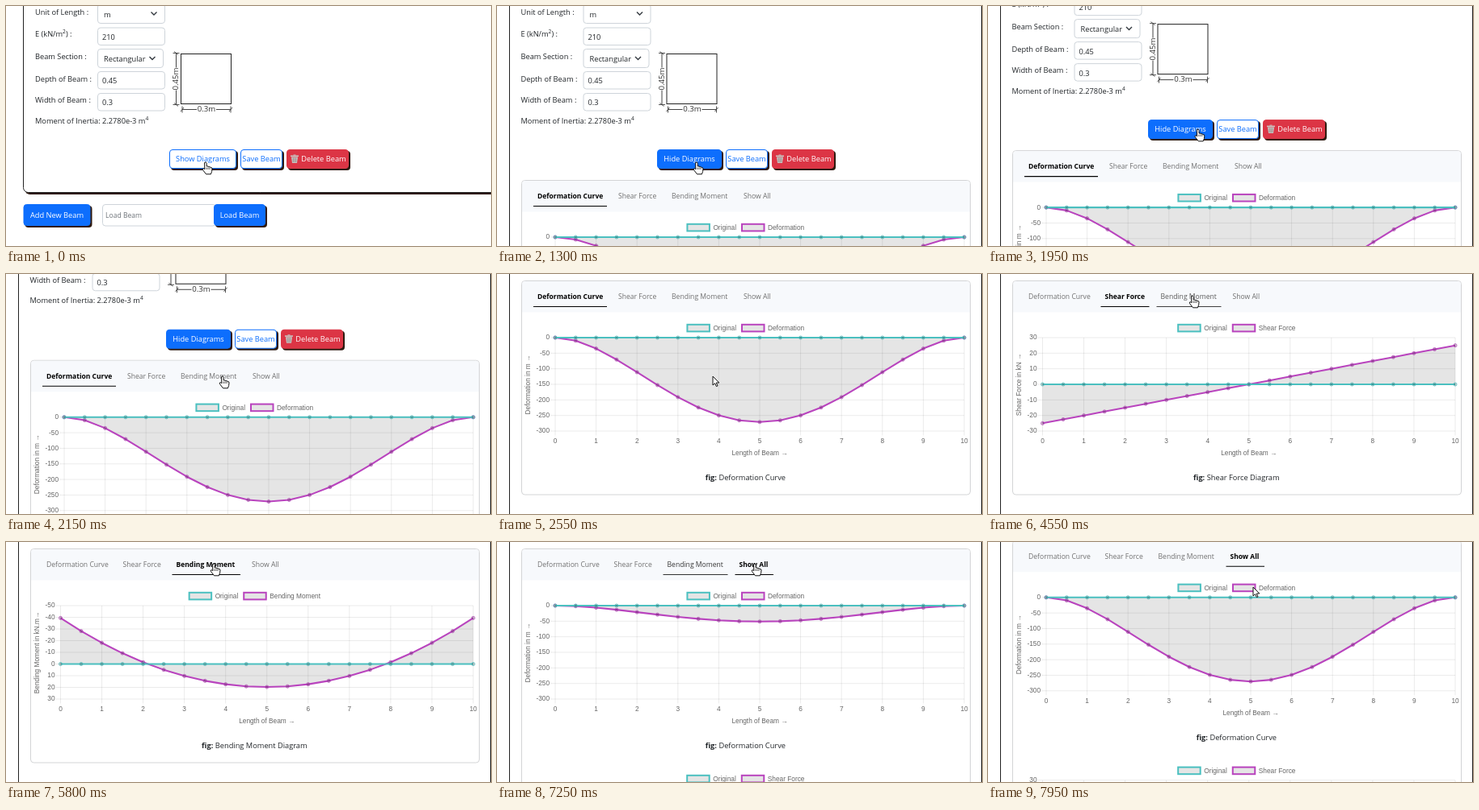
Write an HTML page with a canvas that moves like this. It is 600 px wide and 298 px high and loops after 8 s.

```html
<!DOCTYPE html>
<html lang="en">
<head>
<meta charset="utf-8">
<title>Beam diagrams</title>
<style>
  html, body { margin: 0; width: 100%; height: 100%; overflow: hidden; background: #fff; }
  canvas { display: block; width: 600px; height: 298px; }
</style>
</head>
<body>
<canvas id="stage" width="600" height="298"></canvas>
<script>
const ctx = document.getElementById('stage').getContext('2d');
const LOOP = 8000;
const UI = '"Open Sans", "Noto Sans", sans-serif';
const ARIAL = '"Liberation Sans", Arial, sans-serif';
const BLUE = '#0d6efd', RED = '#dc3545', INK = '#212529', SHADE = '#2e1a10';
const TEAL = '#4bc0c0', PURPLE = '#b944be';

// Moments at which each view opens
const OPEN = 980;
const VIEWS = [OPEN, 3640, 5150, 7200];

const clamp = v => Math.max(0, Math.min(1, v));
const span = (t, a, b) => clamp((t - a) / (b - a));
const smooth = u => u * u * (3 - 2 * u);
const outQuart = u => 1 - (1 - u) ** 4;
const mix = (a, b, u) => a + (b - a) * u;
const grey = v => `rgb(${v},${v},${v})`;

function text(str, x, y, { size = 9.25, color = INK, align = 'left', weight = 400, font = UI } = {}) {
  ctx.font = `${weight} ${size}px ${font}`;
  ctx.fillStyle = color;
  ctx.textAlign = align;
  ctx.textBaseline = 'alphabetic';
  ctx.fillText(str, x, y + size * 0.35);
  return ctx.measureText(str).width;
}

function turned(str, x, y, style) {
  ctx.save();
  ctx.translate(x, y);
  ctx.rotate(-Math.PI / 2);
  text(str, 0, 0, { align: 'center', ...style });
  ctx.restore();
}

function box(x, y, w, h, r, fill, stroke) {
  ctx.beginPath();
  ctx.roundRect(x, y, w, h, r);
  if (fill) { ctx.fillStyle = fill; ctx.fill(); }
  if (stroke) { ctx.strokeStyle = stroke; ctx.lineWidth = 1; ctx.stroke(); }
}

function line(points, color = '#222', width = 1) {
  ctx.beginPath();
  points.forEach(([x, y]) => ctx.lineTo(x, y));
  ctx.strokeStyle = color;
  ctx.lineWidth = width;
  ctx.stroke();
}

function button(label, x, y, w, h, { fill = BLUE, edge = fill, color = '#fff', tx = x + w / 2 } = {}) {
  box(x + 2, y + 2, w, h, 4, SHADE);
  box(x + 0.5, y + 0.5, w - 1, h - 1, 3.5, fill, edge);
  text(label, tx, y + h / 2, { color, align: 'center' });
}

function field(value, y, h, isSelect, w = 83) {
  box(113.5, y + 0.5, w, h, 3.5, '#fff', '#ced4da');
  text(value, isSelect ? 121 : 119, y + h / 2 + 1.5);
  if (isSelect) {
    const x = 110 + w - 10, cy = y + h / 2;
    line([[x - 3.5, cy - 1.5], [x, cy + 2], [x + 3.5, cy - 1.5]], '#343a40', 1.4);
  }
}

function power(str, digit, x, y, tail = '') {
  let end = x + text(str, x, y);
  end += text(digit, end, y - 3, { size: 6.6 });
  text(tail, end, y);
}

// Horizontal dimension line centred on the current origin
function dimension(label, half, gap) {
  const ink = '#444';
  for (const side of [-1, 1]) {
    const x = side * half;
    line([[side * gap, 0], [x, 0]], ink);
    line([[x, -4], [x, 4]], ink, 0.9);
    line([[x - 2, 2.5], [x + 2, -2.5]], ink, 0.9);
  }
  text(label, 0, -0.5, { size: 9.6, align: 'center', color: '#333' });
}

function section() {
  ctx.strokeStyle = '#222';
  ctx.lineWidth = 1;
  ctx.strokeRect(216.5, 59.5, 62, 62);
  ctx.save();
  ctx.translate(210.5, 90.5);
  ctx.rotate(-Math.PI / 2);
  dimension('0.45m', 32, 14);
  ctx.restore();
  ctx.save();
  ctx.translate(248, 128.5);
  dimension('0.3m', 30, 12);
  ctx.restore();
}

function form() {
  text('Unit of Length :', 36, 8);
  field('m', -3, 24, true);
  power('E (kN/m', '2', 36, 34.8, ') :');
  field('210', 26.5, 21.5);
  text('Beam Section :', 36, 62.5);
  field('Rectangular', 53, 23, true, 81);
  text('Depth of Beam :', 36, 90.3);
  field('0.45', 81, 21.5);
  text('Width of Beam :', 36, 117);
  field('0.3', 108, 21.5);
  power('Moment of Inertia: 2.2780e-3 m', '4', 36, 142.3);
  section();
}

function trash(x, y) {
  ctx.fillStyle = '#c9c3c0';
  ctx.beginPath();
  [[1, 3], [9, 3], [8, 10.5], [2, 10.5]].forEach(([a, b]) => ctx.lineTo(x + a, y + b));
  ctx.fill();
  ctx.fillRect(x, y + 1, 10, 1.6);
  ctx.fillRect(x + 3.5, y, 3, 1);
  for (const a of [3.3, 5, 6.7]) line([[x + a, y + 4], [x + a, y + 9.5]], '#8d7f7d', 0.7);
}

function actions(t, isOpen) {
  const [x, w] = isOpen ? [198, 80] : [202, 83];
  const hover = isOpen ? 1 : span(t, 20, 150);
  const tint = `rgb(${mix(255, 13, hover)},${mix(255, 110, hover)},${mix(255, 253, hover)})`;
  button(isOpen ? 'Hide Diagrams' : 'Show Diagrams', x, 178, w, 24,
    { fill: tint, edge: BLUE, color: hover > 0.5 ? '#fff' : BLUE });
  button('Save Beam', x + w + 5, 178, 52, 24, { fill: '#fff', edge: BLUE, color: BLUE });
  button('Delete Beam', x + w + 62, 178, 77, 24, { fill: RED, tx: x + w + 108 });
  trash(x + w + 67, 184.5);
}

const CHARTS = [
  { name: 'Deformation', axis: 'Deformation in m →', fig: 'Deformation Curve',
    left: 72, top: 0, step: -50, rows: 6, f: u => -271 * 16 * u * u * (1 - u) ** 2 },
  { name: 'Shear Force', axis: 'Shear Force in kN →', fig: 'Shear Force Diagram',
    left: 67.5, top: 30, step: -10, rows: 6, f: u => 50 * u - 25 },
  { name: 'Bending Moment', axis: 'Bending Moment in kN.m→', fig: 'Bending Moment Diagram',
    left: 67.5, top: -50, step: 10, rows: 8, f: u => 20 - 60 * (2 * u - 1) ** 2 }
];
const LABEL = { size: 8.3, color: '#666', font: ARIAL };

function legend(name, y) {
  ctx.font = `${LABEL.size}px ${ARIAL}`;
  const items = [['Original', TEAL], [name, PURPLE]];
  const total = items.reduce((sum, [s]) => sum + 33 + ctx.measureText(s).width, 6);
  let x = 307.3 - total / 2;
  for (const [label, color] of items) {
    ctx.fillStyle = 'rgba(0,0,0,.1)';
    ctx.fillRect(x + 1, y - 4.2, 27.5, 8.6);
    ctx.strokeStyle = color;
    ctx.lineWidth = 2;
    ctx.strokeRect(x + 1, y - 4.2, 27.5, 8.6);
    x += 39 + text(label, x + 33, y, LABEL);
  }
}

function series(points, color) {
  ctx.lineJoin = 'round';
  line(points, color, 2.07);
  ctx.lineJoin = 'miter';
  for (const [x, y] of points) {
    ctx.beginPath();
    ctx.arc(x, y, 2.07, 0, 7);
    ctx.fillStyle = 'rgba(0,0,0,.2)';
    ctx.fill();
    ctx.strokeStyle = color;
    ctx.lineWidth = 0.7;
    ctx.stroke();
  }
}

function chart(c, y0, grow) {
  const right = 578, top = y0 + 70.5, height = 116;
  const px = u => mix(c.left, right, u);
  const py = v => top + (v - c.top) / (c.step * c.rows) * height;
  const grid = 'rgba(0,0,0,.1)';
  legend(c.name, y0 + 58.5);
  for (let i = 0; i <= c.rows; i++) {
    const v = c.top + i * c.step, y = py(v);
    line([[c.left - 6, y], [right, y]], grid, 0.8);
    text(String(v), c.left - 7, y - 0.5, { ...LABEL, align: 'right' });
  }
  for (let i = 0; i <= 10; i++) {
    const x = px(i / 10);
    line([[x, top], [x, top + height + 5.5]], grid, 0.8);
    text(String(i), x, y0 + 198.5, { ...LABEL, align: 'center' });
  }
  text('Length of Beam →', px(0.5), y0 + 213.5, { ...LABEL, align: 'center' });
  turned(c.axis, 38, y0 + 129, LABEL);

  const steps = Array.from({ length: 21 }, (_, i) => i / 20);
  const base = steps.map(u => [px(u), py(0)]);
  const curve = steps.map(u => [px(u), py(c.f(u) * grow)]);
  ctx.beginPath();
  [...curve, [right, py(0)], [c.left, py(0)]].forEach(([x, y]) => ctx.lineTo(x, y));
  ctx.fillStyle = grid;
  ctx.fill();
  series(curve, PURPLE);
  series(base, TEAL);

  ctx.font = `700 9.25px ${UI}`;
  const head = ctx.measureText('fig:').width + 2.5;
  ctx.font = `400 9.25px ${UI}`;
  const x = 307.3 - (head + ctx.measureText(c.fig).width) / 2;
  text('fig:', x, y0 + 244, { weight: 700 });
  text(c.fig, x + head, y0 + 244);
}

// Label, plain width, active width, hover times
const TABS = [
  ['Deformation Curve', 75.5, 81, []],
  ['Shear Force', 47, 50, [3250, 4380]],
  ['Bending Moment', 70, 74.5, [4450, 6400]],
  ['Show All', 34.5, 37.5, [6900, 7480]]
];

function tabs(t, view, y0) {
  let x = 50;
  TABS.forEach(([label, plain, bold, [from = 1e9, to = 1e9]], i) => {
    const active = i === view;
    const w = active ? bold : plain;
    const hover = span(t, from, from + 100) * (1 - span(t, to, to + 150));
    const fading = i === view - 1 ? 1 - span(t, VIEWS[view], VIEWS[view] + 250) : 0;
    const level = Math.max(hover * 0.75, fading);
    text(label, x, y0 + 19.5, {
      size: active ? 8.5 : 8.6, weight: active ? 700 : 400,
      color: active ? '#000' : grey(Math.round(mix(112, 40, Math.max(hover * 0.3, fading))))
    });
    const alpha = active ? 1 : level;
    if (alpha > 0) line([[x - 5, y0 + 32], [x + w + 5, y0 + 32]], `rgba(0,0,0,${alpha})`, 1.1);
    x += w + 19;
  });
}

function diagrams(t) {
  const view = VIEWS.filter(start => t >= start).length - 1;
  const grow = outQuart(span(t, VIEWS[view], VIEWS[view] + 1000));
  const y0 = 216.5, h = view === 3 ? 720 : 265.5;
  box(30.5, y0, 555, h, 4, '#fff', '#d3d4d6');
  box(31, y0 + 0.5, 554, 38.5, [4, 4, 0, 0], '#f7f9fc');
  tabs(t, view, y0);
  if (view < 3) chart(CHARTS[view], y0, grow);
  else CHARTS.forEach((c, i) => chart(c, y0 + i * 227, grow));
}

function footer() {
  button('Add New Beam', 21.5, 246, 83, 27);
  box(119.5, 246.5, 140, 26.5, 3.5, '#fff', '#ced4da');
  text('Load Beam', 123, 260, { size: 8.6, color: '#6c7278' });
  button('Load Beam', 257, 246, 64, 27);
}

// Pointer tip: time, x, y
const PATH = [
  [0, 246, 194], [1750, 246, 194], [2100, 267, 127], [2600, 267, 127], [3350, 190, 29],
  [4300, 190, 29], [4530, 252, 27], [5000, 256, 27], [6000, 256, 27], [7050, 318, 27],
  [7300, 318, 27], [7800, 328, 56], [8000, 328, 56]
];
const HAND = [[0, 0], [1.6, 0.2], [2.2, 1.4], [2.2, 5], [4.3, 5], [4.7, 5.8], [6.5, 5.7],
  [7, 6.6], [8.6, 6.8], [9, 8], [8.6, 11.5], [7.4, 14.8], [1.5, 14.8], [-2.6, 9.4],
  [-2.6, 8], [-1.3, 7.8], [-0.2, 8.8], [-0.4, 1]];
const ARROW = [[0, 0], [0, 11], [2.6, 8.7], [4.4, 12.6], [6, 11.9], [4.3, 8], [7.8, 8]];

function pointer(t) {
  const i = PATH.findIndex(([end], n) => n && t <= end);
  const [a, ax, ay] = PATH[i - 1], [b, bx, by] = PATH[i];
  const u = smooth(span(t, a, b));
  const x = mix(ax, bx, u), y = mix(ay, by, u);
  const onChart = (t > 2250 && t < 3150) || t > 7480;
  ctx.beginPath();
  (onChart ? ARROW : HAND).forEach(([dx, dy]) => ctx.lineTo(x + dx, y + dy));
  ctx.closePath();
  ctx.fillStyle = '#fff';
  ctx.fill();
  ctx.strokeStyle = '#111';
  ctx.lineWidth = 1;
  ctx.lineJoin = 'round';
  ctx.stroke();
  if (!onChart) for (const dx of [2, 4, 6]) line([[x + dx, y + 6.5], [x + dx, y + 9]], '#111', 0.7);
  ctx.lineJoin = 'miter';
}

function draw(t) {
  const isOpen = t >= OPEN;
  const scroll = 208 * smooth(span(t, 1735, 2540)) + 10 * (Math.max(0, t - 7850) / 100) ** 2;
  ctx.fillStyle = '#fff';
  ctx.fillRect(0, 0, 600, 298);
  ctx.save();
  ctx.translate(0, -scroll);
  if (isOpen) {
    box(15.5, -40, 584, 1100, 6, '#fff', '#222');
  } else {
    box(23.5, -40, 640, 274, 6, SHADE);
    box(21.5, -40, 640, 271.5, 6, '#fff', '#222');
  }
  ctx.save();
  if (isOpen) ctx.translate(-6.5, 0);
  form();
  ctx.restore();
  actions(t, isOpen);
  if (isOpen) diagrams(t);
  else footer();
  ctx.restore();
  pointer(t);
}

const begin = performance.now();
function tick() {
  draw((performance.now() - begin) % LOOP);
  requestAnimationFrame(tick);
}
tick();
</script>
</body>
</html>
```
